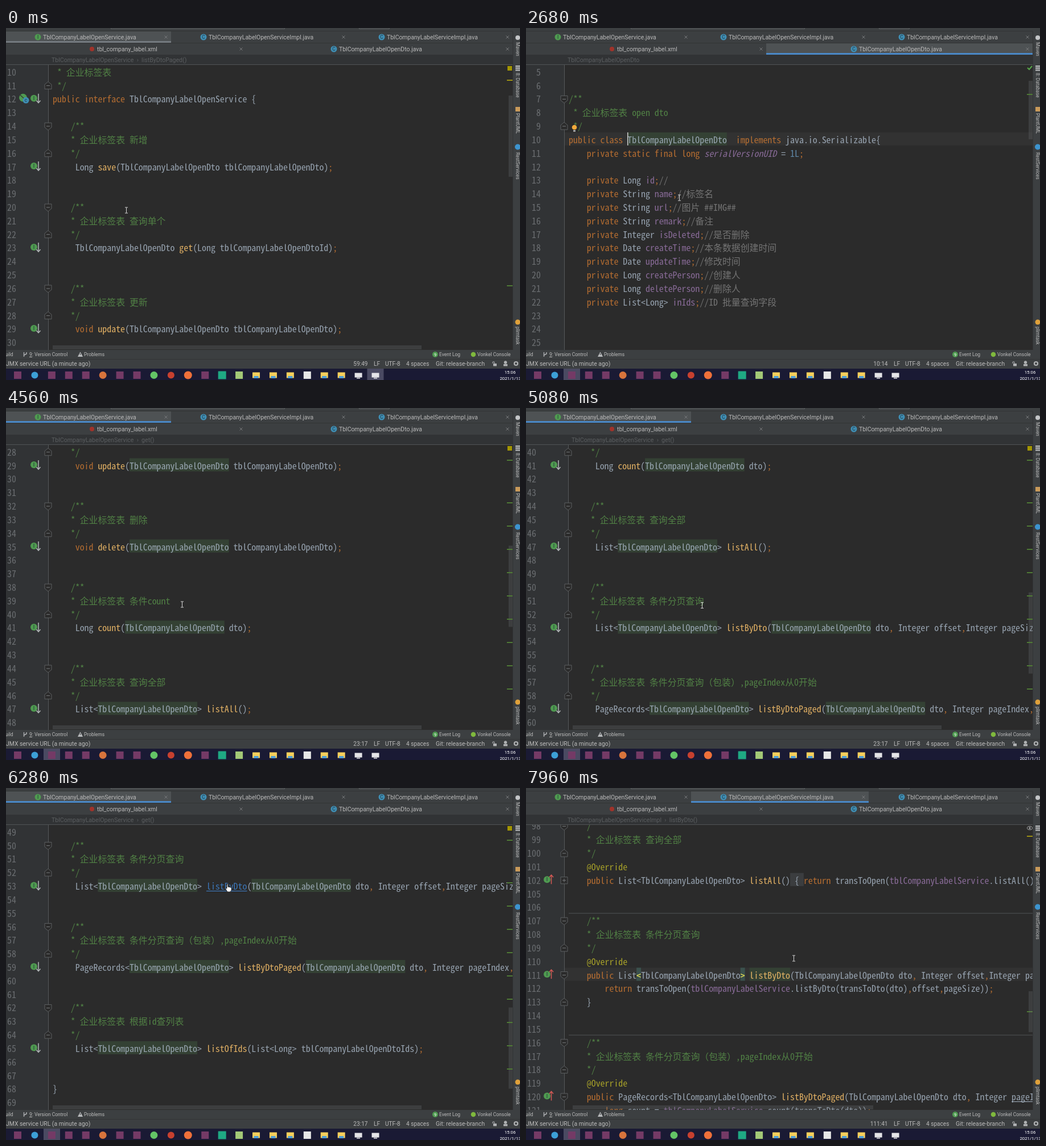
These frames come from a looping animation (903 px wide and 620 px high, 8000 ms). An HTML page with a canvas:

```html
<!DOCTYPE html>
<html lang="zh">
<head>
<meta charset="utf-8">
<title>Editor walkthrough</title>
<style>
html, body { margin: 0; width: 100%; height: 100%; overflow: hidden; background: #2b2b2b; }
canvas { display: block; width: 903px; height: 620px; }
</style>
</head>
<body>
<canvas id="stage" width="903" height="620"></canvas>
<script>
const ctx = document.getElementById('stage').getContext('2d');
const LOOP = 8000, STEP = 40;
const CW = 7.94, LH = 23.83, TOP = 65, RIGHT = 890;
const MONO = '"Noto Sans Mono CJK SC", "Noto Sans Mono CJK JP", "Liberation Mono", monospace';
const HAN = '"Noto Sans CJK SC", "Noto Sans Mono CJK SC", sans-serif';
const UI = 'Roboto, "Open Sans", sans-serif';
const C = {
  bg: '#2b2b2b', panel: '#3c3f41', gutter: '#313335', row: '#323232', num: '#75787b',
  text: '#a9b7c6', key: '#cc7832', doc: '#578f49', note: '#808080', fn: '#ffc66d',
  field: '#9876aa', anno: '#bbb529', lit: '#6897bb', link: '#3f82cf', hit: '#344134',
  mark: '#4f7a35', warn: '#9c9014', ui: '#bbbbbb', green: '#4f9a50', blue: '#3f8fb5'
};
const DTO = 'TblCompanyLabelOpenDto';

// font size giving the code grid its cell width
ctx.font = `300 100px ${MONO}`;
const monoSize = CW * 100 / ctx.measureText('0').width;

// ---------- document contents ----------
const svc = { 10: ' * 企业标签表', 11: ' */', 12: 'public interface TblCompanyLabelOpenService {', 68: '}' };
[
  ['新增', `Long save(${DTO} tblCompanyLabelOpenDto);`],
  ['查询单个', `${DTO} get(Long tblCompanyLabelOpenDtoId);`],
  ['更新', `void update(${DTO} tblCompanyLabelOpenDto);`],
  ['删除', `void delete(${DTO} tblCompanyLabelOpenDto);`],
  ['条件count', `Long count(${DTO} dto);`],
  ['查询全部', `List<${DTO}> listAll();`],
  ['条件分页查询', `List<${DTO}> listByDto(${DTO} dto, Integer offset,Integer pageSize);`],
  ['条件分页查询（包装）,pageIndex从0开始', `PageRecords<${DTO}> listByDtoPaged(${DTO} dto, Integer pageIndex, Integer pageSize);`],
  ['根据id查列表', `List<${DTO}> listOfIds(List<Long> tblCompanyLabelOpenDtoIds);`]
].forEach(([about, code], i) => {
  const n = 14 + i * 6;
  svc[n] = '    /**';
  svc[n + 1] = '    * 企业标签表 ' + about;
  svc[n + 2] = '    */';
  svc[n + 3] = '     ' + code;
});

const dto = ['', '', '/**', ' * 企业标签表 open dto', ' */',
  `public class ${DTO}  implements java.io.Serializable{`,
  '    private static final long serialVersionUID = 1L;', '',
  ...['Long id;//', 'String name;//标签名', 'String url;//图片 ##IMG##', 'String remark;//备注',
    'Integer isDeleted;//是否删除', 'Date createTime;//本条数据创建时间', 'Date updateTime;//修改时间',
    'Long createPerson;//创建人', 'Long deletePerson;//删除人', 'List<Long> inIds;//ID 批量查询字段'
  ].map(s => '    private ' + s), '', '', ''];

const impl = ['    /**', '    * 企业标签表 查询全部', '    */', '    @Override',
  `    public List<${DTO}> listAll() { return transToOpen(tblCompanyLabelService.listAll());`, '', '',
  '    /**', '    * 企业标签表 条件分页查询', '    */', '    @Override',
  `    public List<${DTO}> listByDto(${DTO} dto, Integer offset,Integer pageSize) {`,
  '        return transToOpen(tblCompanyLabelService.listByDto(transToDto(dto),offset,pageSize));',
  '    }', '', '',
  '    /**', '    * 企业标签表 条件分页查询（包装）,pageIndex从0开始', '    */', '    @Override',
  `    public PageRecords<${DTO}> listByDtoPaged(${DTO} dto, Integer pageIndex, Integer pageSize) {`,
  '        long count = tblCompanyLabelService.count(transToDto(dto));'];

// ---------- drawing helpers ----------
function box(x, y, w, h, color) { ctx.fillStyle = color; ctx.fillRect(x, y, w, h); }
function dot(x, y, r, color) {
  ctx.fillStyle = color; ctx.beginPath(); ctx.arc(x, y, r, 0, 7); ctx.fill();
}
function path(points, color, width = 1, fill) {
  ctx.beginPath();
  points.forEach(([x, y], i) => i ? ctx.lineTo(x, y) : ctx.moveTo(x, y));
  if (fill) { ctx.closePath(); ctx.fillStyle = fill; ctx.fill(); }
  if (color) { ctx.strokeStyle = color; ctx.lineWidth = width; ctx.stroke(); }
}
function label(s, x, y, size, color = C.ui, align = 'left') {
  ctx.font = `${size}px ${UI}`;
  ctx.textAlign = align;
  ctx.fillStyle = color;
  ctx.fillText(s, x, y + size * 0.355);
  ctx.textAlign = 'left';
}
const cells = s => [...s].reduce((n, c) => n + (c > '\u2e80' ? 2 : 1), 0);
function mono(s, x, y, color, italic = '') {
  ctx.fillStyle = color;
  ctx.globalAlpha = 0.86; // softens the strokes
  for (const run of s.match(/[\u2e80-\uffff]|[^\u2e80-\uffff]+/g) || []) {
    const han = run > '\u2e80';
    ctx.font = `${italic} 300 ${han ? CW * 2 : monoSize}px ${han ? HAN : MONO}`;
    ctx.fillText(run, x, y + 19);
    x += cells(run) * CW;
  }
  ctx.globalAlpha = 1;
}

const KEYS = /^(public|interface|class|implements|private|static|final|long|void|return)$/;
function code(line, x, y, link) {
  if (/^\s*[/*]/.test(line)) return mono(line, x, y, C.doc);
  let named = /^\s*(return|long)/.test(line), pos = 0;
  for (const tok of line.match(/\/\/.*|@\w+|\w+|[;,]|[^\w;,@]+/g) || []) {
    const next = line[pos + tok.length], at = x + pos * CW;
    let color = C.text;
    if (tok.startsWith('//')) color = C.note;
    else if (KEYS.test(tok) || /^[;,]$/.test(tok)) color = C.key;
    else if (tok[0] === '@') color = C.anno;
    else if (tok === '1L') color = C.lit;
    else if (/^(tblCompanyLabelService|serialVersionUID)$/.test(tok) || (/^\s*private/.test(line) && next === ';')) color = C.field;
    else if (!named && next === '(' && /\w/.test(tok)) { color = C.fn; named = true; }
    if (tok === link) {
      color = C.link;
      box(at, y + 21, tok.length * CW, 1, color);
    }
    mono(tok, at, y, color, tok === 'serialVersionUID' ? 'italic' : '');
    pos += tok.length;
  }
}

function fold(x, y, kind) {
  const d = kind === 'up' ? -1 : 1;
  const shape = kind === 'plus'
    ? [[x - 6, y - 6], [x + 6, y - 6], [x + 6, y + 6], [x - 6, y + 6]]
    : [[x - 6, y - 6 * d], [x + 6, y - 6 * d], [x + 6, y + 2 * d], [x, y + 7 * d], [x - 6, y + 2 * d]];
  path([...shape, shape[0]], '#5c5f61', 1, C.bg);
  box(x - 3, y - 0.5, 6, 1, '#777a7c');
  if (kind === 'plus') box(x - 0.5, y - 3, 1, 6, '#777a7c');
}
function foldKind(s) {
  if (/^\s*\/\*\*/.test(s)) return 'down';
  if (/^\s*\*\//.test(s) || s === '    }') return 'up';
  if (/^    public/.test(s)) return s.includes('{ return') ? 'plus' : 'down';
}
function badge(x, y, letter, color, r = 6) {
  dot(x, y, r, color);
  label(letter, x, y, r * 1.5, '#20303a', 'center');
}
function arrow(x, y, d, color) {
  path([[x, y - 8 * d], [x, y + 8 * d]], color, 1.5);
  path([[x - 3.5, y + 4 * d], [x, y + 8 * d], [x + 3.5, y + 4 * d]], color, 1.5);
}
function bulb(x, y) {
  dot(x, y - 1, 4.3, '#f2a93b');
  box(x - 2, y + 4, 4, 2.5, '#b8b8b8');
}
function stripe(y, color = C.mark) { box(880, y - 1, 10, 2, color); }

// ---------- editor views ----------
function page(gutter, draw) {
  ctx.save();
  ctx.beginPath(); ctx.rect(0, TOP, RIGHT, 502); ctx.clip();
  box(0, TOP, RIGHT, 502, C.bg);
  box(0, TOP, gutter, 502, C.gutter);
  box(gutter, TOP, 1, 502, '#55585a');
  draw();
  ctx.restore();
}
function thumb(y, h) { box(883, y, 7, h, 'rgba(110,112,114,.28)'); }
function hbar(x, w) { box(x, 559, w, 7, 'rgba(110,112,114,.28)'); }
function row(n, s, numX, x, y, foldX, link) {
  mono(String(n), numX, y, C.num);
  const kind = foldKind(s);
  if (kind) fold(foldX, y + 13, kind);
  code(s, x, y, link);
}

function service(scroll, lit, used, link) {
  page(74, () => {
    const first = 10 + scroll, x = 82;
    for (let r = 0; r < 22; r++) {
      const n = first + r, s = svc[n] || '', y = TOP + r * LH - 0.3;
      if (lit && n === 23) box(75, y, 815, 23, C.row);
      if (used) {
        for (const m of s.matchAll(/\bTblCompanyLabelOpenDto\b/g)) box(x + m.index * CW, y, DTO.length * CW, 23, C.hit);
      }
      row(n, s, 2, x, y, 74, link && link.line === n ? link.word : null);
      if (/^(public|     \w)/.test(s)) {
        badge(49, y + 11.5, 'I', C.green);
        arrow(57, y + 11.5, 1, '#b4b8ba');
      }
      if (n === 12) {
        dot(30, y + 10.5, 7, C.green);
        path([[25, y + 6], [34, y + 14]], C.gutter, 1.3);
        badge(35, y + 15, 'c', C.blue, 5.5);
      }
      if (used && n === 23) bulb(91, y + 10);
    }
    hbar(82, 648);
    thumb(119 + scroll * 6.86, 143);
    box(881, 67, 8, 8, '#a39500');
    stripe(92, used ? C.mark : C.warn);
    if (used) for (let i = 0; i < 9; i++) stripe(167 + i * 41);
    else stripe(454);
  });
}

function entity(ready) {
  page(67, () => {
    const y = TOP + 5 * LH - 0.3;
    box(68, y, 822, 23, C.row);
    box(75 + 13 * CW, y, DTO.length * CW, 23, C.hit);
    dto.forEach((s, r) => row(r + 5, s, r < 5 ? 18 : 10, 75, TOP + r * LH - 0.3, 67));
    box(178, y, 1.5, 23, '#d0d0d0');
    thumb(93, 103);
    if (ready) {
      bulb(85, 176);
      path([[881, 70], [884, 73], [889, 67]], '#57a64a', 2);
      stripe(117);
    }
  });
}

function implementation(marked, checked) {
  page(67, () => {
    const x = 75, top = 54.4;
    const at = c => x + c * CW;
    const cur = top + 11 * LH;
    box(68, cur, 822, 23, C.row);
    if (marked) {
      box(at(40), cur, 9 * CW, 23, C.hit);
      for (const c of [15, 38]) box(at(c), cur, CW, 23, '#3b514d');
    }
    box(at(49), top + 4 * LH, 3 * CW, 23, '#3b3d3f');
    for (const r of [7, 16]) box(75, top + r * LH - 1, 815, 1, '#4f5254');
    impl.forEach((s, r) => {
      const y = top + r * LH, n = 98 + r + (r > 4 ? 2 : 0);
      row(n, s, n < 100 ? 10 : 2, x, y, 67);
      if (/^    public/.test(s)) {
        badge(37, y + 11.5, 'I', C.green);
        arrow(44.5, y + 11.5, -1, '#d65a56');
      }
    });
    if (marked) {
      mono('<', at(15), cur, '#ffef28');
      mono('>', at(38), cur, '#ffef28');
    }
    if (checked) {
      box(at(98), top + 20 * LH + 21, 50, 1, C.text);
      stripe(394);
    }
    hbar(82, 528);
    thumb(358, 72);
    ctx.beginPath(); ctx.ellipse(885, 70.5, 4.5, 3, 0, 0, 7);
    ctx.strokeStyle = '#afb1b3'; ctx.lineWidth = 1; ctx.stroke();
    dot(885, 70.5, 1.5, '#afb1b3');
    stripe(85, C.warn);
  });
}

// ---------- window frame ----------
const TABS = [
  { x: 0, y: 6, w: 290, tx: 65, name: 'TblCompanyLabelOpenService.java', kind: 'I' },
  { x: 290, y: 6, w: 312, tx: 356, name: 'TblCompanyLabelOpenServiceImpl.java', kind: 'C' },
  { x: 602, y: 6, w: 288, tx: 669, name: 'TblCompanyLabelServiceImpl.java', kind: 'C' },
  { x: 0, y: 27, w: 422, tx: 160, name: 'tbl_company_label.xml' },
  { x: 422, y: 27, w: 468, tx: 585, name: 'TblCompanyLabelOpenDto.java', kind: 'C' }
];
function tabs(active, focused) {
  box(0, 0, 903, 47, C.panel);
  path([[184.5, 0], [184.5, 1.5], [489.5, 1.5], [489.5, 0]], '#5e6163');
  path([[620.5, 0], [620.5, 1.5], [673.5, 1.5], [673.5, 0]], '#5e6163');
  box(0, 5, RIGHT, 1, '#323435');
  box(0, 26, RIGHT, 1, '#323435');
  TABS.forEach((tab, i) => {
    const { x, y, w, tx } = tab, cy = y + 10;
    if (i === active) {
      box(x, y, w, 20, '#4e5254');
      box(x, y + 17, w, 3, focused ? '#4a88c7' : '#747a80');
    }
    if (tab.kind) badge(tx - 9, cy, tab.kind, tab.kind === 'I' ? C.green : C.blue, 5.5);
    else dot(tx - 9, cy, 4, '#a0332a');
    label(tab.name, tx, cy, 10.45);
    const cx = x + w - 9;
    path([[cx - 2.5, cy - 2.5], [cx + 2.5, cy + 2.5]], '#77797b');
    path([[cx + 2.5, cy - 2.5], [cx - 2.5, cy + 2.5]], '#77797b');
  });
}
function crumbs(x, s) {
  box(0, 47, RIGHT, 18, C.gutter);
  box(0, 64, RIGHT, 1, '#505355');
  label(s, x, 56, 10.6, '#5b5e60');
}
function sideText(s, y) {
  ctx.save();
  ctx.translate(899, y);
  ctx.rotate(Math.PI / 2);
  label(s, 0, 0, 8.3);
  ctx.restore();
}
function sidebar() {
  box(RIGHT, 6, 13, 577, C.panel);
  box(RIGHT, 6, 1, 561, '#323435');
  dot(899, 17, 4, '#c4c6c8');
  sideText('Maven', 25);
  for (let i = 0; i < 3; i++) box(895, 66 + i * 3.5, 8, 2.5, '#afb1b3');
  sideText('8: Database', 79);
  box(895, 139, 8, 8, '#c99a5a');
  sideText('PlantUML', 150);
  dot(899, 209.5, 5, '#3d94cf');
  sideText('RestServices', 219);
  dot(899, 518, 4.5, '#e0a13a');
  sideText('plimtask', 526);
}
function statusBar(place) {
  box(0, 567, 903, 33, C.panel);
  box(0, 583, 903, 1, '#323435');
  label('uild', -1, 575, 8.5);
  path([[31.5, 571], [31.5, 579]], '#afb1b3', 1.4);
  path([[32, 576], [36, 574], [36, 571]], '#afb1b3', 1.4);
  label('9: Version Control', 41, 575, 8.5);
  box(41, 579, 5, 1, C.ui);
  path([[130.5, 570.5], [135, 579], [126, 579]], null, 0, '#b9bbbd');
  box(130, 573, 1, 3, C.panel);
  label('Problems', 137, 575, 8.5);
  dot(754, 575, 5, C.green);
  label('9', 754, 575, 7.5, '#fff', 'center');
  label('Event Log', 761, 575, 8.5);
  dot(821, 575, 4.3, '#7fb83d');
  label('Vonkel Console', 828, 575, 8.5);
  label('JMX service URL (a minute ago)', 0, 591.5, 10.4);
  label(place, 635.5, 591.5, 10.1, C.ui, 'right');
  label('LF', 646, 591.5, 10.1);
  label('UTF-8', 666, 591.5, 10.1);
  label('4 spaces', 703, 591.5, 10.1);
  label('Git: release-branch', 755, 591.5, 10.4);
  box(856, 591, 6, 4.5, '#afb1b3');
  path([[855, 591], [855, 588], [858, 588], [858, 591]], '#afb1b3');
  dot(877.5, 589, 2.7, '#afb1b3');
  box(874, 592, 7, 3.5, '#afb1b3');
  ctx.strokeStyle = '#afb1b3'; ctx.lineWidth = 2.2;
  ctx.beginPath(); ctx.arc(896, 591, 3, 0, 7); ctx.stroke();
}
function taskbar(active) {
  box(0, 600, 903, 20, '#1a1a34');
  box(active - 14.5, 600, 29, 20, '#4a4a62');
  const at = i => 20.5 + i * 29.93;
  const square = (i, color, w = 13, h = 13) => box(at(i) - w / 2, 611.5 - h / 2, w, h, color);
  for (const i of [0, 2, 3, 4, 6, 7, 11]) square(i, '#743a66');
  dot(at(1), 611.5, 6, '#3d9fd8');
  dot(at(5), 611.5, 6.5, '#d8743c');
  dot(at(8), 611.5, 6.5, '#63c466');
  dot(at(9), 611.5, 6, '#c8402f');
  dot(at(10), 611.5, 7, '#f0703a');
  square(12, '#1fa884', 14, 14);
  square(13, '#a3c877');
  for (const i of [14, 15, 16, 18, 19]) {
    square(i, '#f6cf5c', 13, 10);
    box(at(i) - 4, 613, 8, 4, '#4d9ed8');
  }
  square(17, '#e8e8e8');
  for (const i of [20, 21]) {
    square(i, '#e4e4e8', 13, 8);
    box(at(i) - 3, 616, 6, 1.5, '#e4e4e8');
  }
  label('15:06', 885.5, 606.5, 7.9, '#fff', 'center');
  label('2021/1/13', 886, 617, 7.8, '#fff', 'center');
}

// ---------- pointer ----------
const MOVES = [[0, 211, 321], [80, 211, 321], [360, 232, 391], [2640, 232, 391], [2680, 269, 299],
  [3480, 305, 341], [3760, 308, 347], [4560, 309, 346], [5560, 309.5, 349], [5760, 309.5, 349],
  [6240, 391, 176], [6920, 391, 176], [7240, 397, 333], [7680, 397, 333], [7960, 470, 300]];
function pointerAt(t) {
  const i = MOVES.findIndex(m => m[0] > t);
  if (i < 0) return MOVES[MOVES.length - 1].slice(1);
  const [a, x0, y0] = MOVES[i - 1], [b, x1, y1] = MOVES[i];
  let k = (t - a) / (b - a);
  k = k * k * (3 - 2 * k);
  return [x0 + (x1 - x0) * k, y0 + (y1 - y0) * k];
}
function pointer(x, y, hand) {
  if (hand) {
    const pts = [[-3, -7], [-1, -7], [-1, -2], [4, -1], [5, 0], [5, 4], [3, 7], [-2, 7], [-5, 2], [-4, 0], [-3, 1]];
    const shape = pts.map(([a, b]) => [x + a, y + b]);
    path([...shape, shape[0]], '#222', 1, '#fff');
    return;
  }
  x = Math.round(x) + 0.5;
  path([[x, y - 4.5], [x, y + 4.5]], '#d8d8d8');
  for (const d of [-5, 5]) path([[x - 2.5, y + d], [x + 2.5, y + d]], '#d8d8d8');
}

// ---------- timeline ----------
const TICKS = [3840, 3920, 4040, 4200, 4360, 4560, 4640, 4800, 5000, 5080, 5320, 5560, 5640];
const OPEN = 600, BACK = 3080, JUMP = 7080;

function hoverLink(t) {
  if (t >= 280 && t < OPEN) return { line: 23, word: DTO };
  if (t >= 6200 && t < JUMP) return { line: 53, word: 'listByDto' };
  return null;
}

function render(t) {
  const focused = t >= 520, link = hoverLink(t);
  const inDto = t >= OPEN && t < BACK, inImpl = t >= JUMP;
  const name = 'TblCompanyLabelOpenService';
  let place = focused ? '23:17' : '59:49';
  if (inDto) {
    place = '10:14';
    tabs(4, true);
    crumbs(73, DTO);
    entity(t >= 680);
  } else if (inImpl) {
    place = '111:41';
    tabs(1, true);
    crumbs(73, name + 'Impl  ›  listByDto()');
    implementation(t >= 7240, t >= 7440);
  } else {
    tabs(0, focused);
    crumbs(80, name + (focused ? '  ›  get()' : '  ›  listByDtoPaged()'));
    const scroll = 3 * TICKS.filter(v => v <= t).length;
    service(scroll, focused, t >= BACK + 160, link);
  }
  sidebar();
  statusBar(place);
  taskbar(focused ? 80.5 : 649);
  pointer(...pointerAt(t), !!link);
}

const start = performance.now();
function tick() {
  const t = (performance.now() - start) % LOOP;
  render(Math.floor(t / STEP) * STEP);
  requestAnimationFrame(tick);
}
tick();
</script>
</body>
</html>
```
